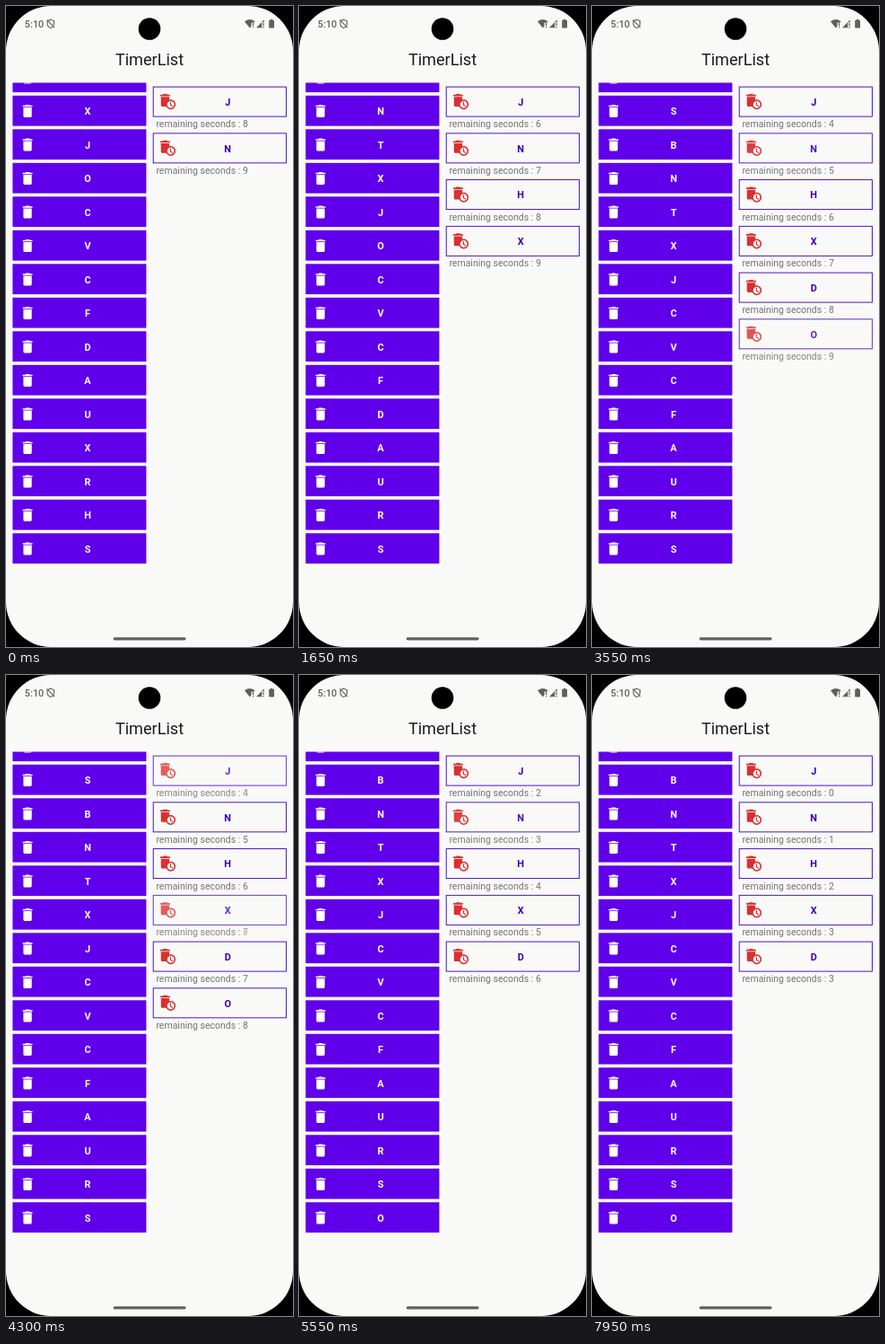
These frames come from a looping animation (320 px wide and 714 px high, 8 s). An HTML page with a canvas:

```html
<!DOCTYPE html>
<html lang="en">
<head>
<meta charset="utf-8">
<title>TimerList</title>
<style>
  html, body { margin: 0; width: 100%; height: 100%; overflow: hidden; background: #000; }
  canvas { display: block; width: 320px; height: 714px; }
</style>
</head>
<body>
<canvas id="stage"></canvas>
<script>
const W = 320, H = 714, LOOP = 8000;
const FADE = 120, MOVE = 250, TICK = 1000;
const BG = '#f9f9f8', PURPLE = '#6000ea', INDIGO = '#3700b3', RED = '#d93031', GREY = '#5f5f5f';
const ROBOTO = 'Roboto, sans-serif';
const ICON_SCALE = 0.778;

const canvas = document.getElementById('stage');
const ctx = canvas.getContext('2d');
const dpr = window.devicePixelRatio || 1;
canvas.width = W * dpr;
canvas.height = H * dpr;

const bin = new Path2D('M6 19c0 1.1.9 2 2 2h8c1.1 0 2-.9 2-2V7H6v12zM19 4h-3.5l-1-1h-5l-1 1H5v2h14V4z');
const timedBin = new Path2D('M15 2h-3.5l-1-1h-5l-1 1H1v2h14V2zM16 9c-.7 0-1.37.1-2 .29V5H2v12c0 1.1.9 2 2 2h5.68' +
  'c1.12 2.36 3.53 4 6.32 4 3.87 0 7-3.13 7-7s-3.13-7-7-7zm0 12c-2.76 0-5-2.24-5-5s2.24-5 5-5 5 2.24 5 5' +
  '-2.24 5-5 5zM16.5 12H15v5l3.6 2.1.8-1.2-2.9-1.7V12z');

// Left list from the bottom up; some rows leave at a given time.
const leaveTimes = { 1: 300, 3: 1200, 6: 1690, 11: 2497 };
const rows = [...'SHRXUADFCVCOJXTNBSK'].map((label, i) => ({ label, leave: leaveTimes[i] ?? Infinity }));
const RETURN = 4700, SCROLL = 5020, SCROLL_TIME = 120;

// Right list: each card counts down from 9 at its start.
const cards = [
  { label: 'J', start: -1800 },
  { label: 'N', start: -650 },
  { label: 'H', start: 300 },
  { label: 'X', start: 1200 },
  { label: 'D', start: 1690 },
  { label: 'O', start: 2465, end: RETURN }
];

// Accelerate, then decelerate, from 0 to 1.
function ease(time, duration) {
  const x = Math.min(1, Math.max(0, time / duration));
  return 0.5 - 0.5 * Math.cos(Math.PI * x);
}

function text(str, x, y, size, color, weight = 400, align = 'left') {
  ctx.font = `${weight} ${size}px ${ROBOTO}`;
  ctx.textAlign = align;
  ctx.fillStyle = color;
  ctx.fillText(str, x, y);
}

function icon(path, x, y, color) {
  ctx.save();
  ctx.translate(x, y);
  ctx.scale(ICON_SCALE, ICON_SCALE);
  ctx.fillStyle = color;
  ctx.fill(path);
  ctx.restore();
}

function shape(points, color) {
  ctx.beginPath();
  points.forEach(([x, y]) => ctx.lineTo(x, y));
  ctx.closePath();
  ctx.fillStyle = color;
  ctx.fill();
}

function pill(x, y, w, h, r, color) {
  ctx.beginPath();
  ctx.roundRect(x, y, w, h, r);
  ctx.fillStyle = color;
  ctx.fill();
}

function drawRow(label, y, alpha) {
  if (alpha <= 0 || y < 50) return;
  ctx.globalAlpha = alpha;
  ctx.fillStyle = PURPLE;
  ctx.fillRect(7.4, y, 149, 33.8);
  icon(bin, 14.7, y + 7.8, '#fff');
  text(label, 91, y + 21.3, 10.9, '#fff', 700, 'center');
  ctx.globalAlpha = 1;
}

function drawRows(t) {
  const pitch = 37.5;
  const scroll = pitch * ease(t - SCROLL, SCROLL_TIME);
  let y = 587.3 - scroll;
  drawRow('O', y + pitch, ease(t - RETURN, FADE));
  for (const { label, leave } of rows) {
    drawRow(label, y, 1 - ease(t - leave, FADE));
    y -= pitch * (1 - ease(t - leave - FADE, MOVE));
  }
}

function drawCard(label, y, seconds, alpha) {
  if (alpha <= 0) return;
  ctx.globalAlpha = alpha;
  ctx.strokeStyle = INDIGO;
  ctx.lineWidth = 0.9;
  ctx.strokeRect(164.2, y + 0.4, 148.2, 33);
  icon(timedBin, 171.2, y + 7.6, RED);
  text(label, 247.2, y + 21.2, 10.9, INDIGO, 700, 'center');
  text(`remaining seconds : ${seconds}`, 167.4, y + 45.3, 10.5, '#747474');
  ctx.globalAlpha = 1;
}

function drawCards(t) {
  cards.forEach(({ label, start, end = Infinity }, i) => {
    const age = t - start;
    if (age < 0) return;
    const y = 89.7 + 51.75 * i;
    const ticks = Math.floor(age / TICK);
    const shown = ease(age, FADE) * (1 - ease(t - end, FADE));
    const mix = ticks > 0 ? ease(age % TICK, MOVE) : 1;
    drawCard(label, y, 10 - ticks, shown * (1 - mix));
    drawCard(label, y, 9 - ticks, shown * mix);
  });
}

function drawStatusBar() {
  text('5:10', 20.8, 23.6, 10.9, GREY, 500);

  ctx.strokeStyle = GREY;
  ctx.lineWidth = 1.1;
  ctx.stroke(new Path2D('M49.8 15.2L53.5 16.6V19.4C53.5 21.8 52 23.6 49.8 24.4C47.6 23.6 46.1 21.8 46.1 19.4V16.6Z'));
  ctx.stroke(new Path2D('M45.6 15.4L54 24.2'));

  ctx.fillStyle = GREY;
  ctx.fill(new Path2D('M266 17.2Q271.8 12.8 277.6 17.2L271.8 24.4Z'));
  ctx.fillStyle = BG;
  ctx.fillRect(273.6, 18.6, 4.2, 6);
  ctx.fillStyle = GREY;
  ctx.fillRect(275, 19, 1.2, 3.2);
  ctx.fillRect(275, 23.1, 1.2, 1.2);

  shape([[279, 24.3], [287.8, 15.2], [287.8, 24.3]], GREY);
  ctx.fillStyle = BG;
  ctx.fillRect(285.2, 18.2, 2.8, 6.2);
  ctx.fillStyle = GREY;
  ctx.fillRect(286.4, 19, 1.2, 3.2);
  ctx.fillRect(286.4, 23.1, 1.2, 1.2);

  pill(293.2, 15.8, 5.8, 8.7, 0.8, GREY);
  ctx.fillRect(294.8, 14.8, 2.6, 1.4);
}

function draw(t) {
  ctx.setTransform(dpr, 0, 0, dpr, 0, 0);
  ctx.fillStyle = '#000';
  ctx.fillRect(0, 0, W, H);
  pill(0, 0, W, H, 50, BG);

  drawStatusBar();
  pill(147.7, 13.2, 24.6, 24.6, 12.3, '#000');
  text('TimerList', 160, 66, 18.1, '#1c1b1f', 400, 'center');

  ctx.save();
  ctx.beginPath();
  ctx.rect(0, 85.6, W, 580);
  ctx.clip();
  drawRows(t);
  drawCards(t);
  ctx.restore();

  pill(119.6, 703.2, 81, 3.2, 1.6, '#606060');
}

const begin = performance.now();
function frame() {
  draw((performance.now() - begin) % LOOP);
  requestAnimationFrame(frame);
}
frame();
</script>
</body>
</html>
```
